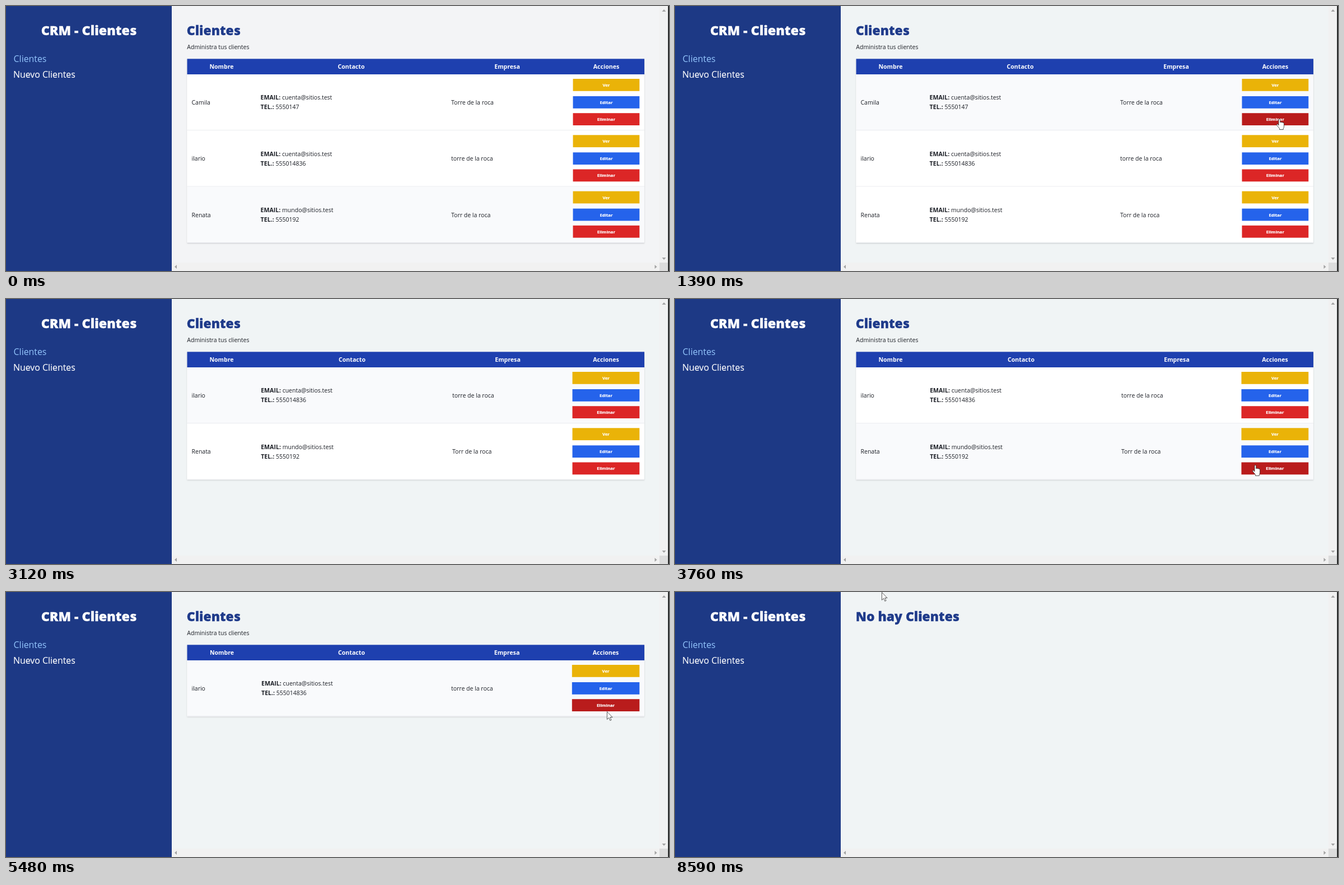
Recreate the animation shown at these times as an HTML page. Size 1184 by 473 pixels, loop 8.99 s.

```html
<!DOCTYPE html>
<html lang="es">
<head>
<meta charset="utf-8">
<title>CRM - Clientes</title>
<style>
html, body { margin: 0; width: 100%; height: 100%; overflow: hidden; background: #f0f4f5; }
svg { display: block; width: 1184px; height: 473px; }
text { font: 400 10.5px "Open Sans", "Noto Sans", sans-serif; fill: #1c1f26; }
.b { font-weight: 700; font-size: 10.6px; }
.th { fill: #fff; text-anchor: middle; }
.title { font-weight: 800; font-size: 22.9px; fill: #1e3a8a; stroke: #1e3a8a; stroke-width: .3px; }
.brand { font-size: 23.3px; fill: #fff; stroke: #fff; text-anchor: middle; }
.link { font-size: 15.9px; fill: #fff; stroke: #fff; stroke-width: .15px; }
.on { fill: #93c5fd; stroke: none; }
.btn { font-weight: 700; font-size: 7.7px; fill: #fff; stroke: #fff; stroke-width: .2px; text-anchor: middle; }
.bar { fill: #f1f1f1; }
.tip { fill: #a3a3a3; }
.card { filter: drop-shadow(0 1px 1.2px rgba(0, 0, 0, .16)); }
#cursor path { fill: #fff; stroke: #222; stroke-width: .75px; stroke-linejoin: round; }
</style>
</head>
<body>
<svg viewBox="0 0 1184 473">
  <rect id="page" x="296" width="888" height="473"/>
  <rect width="296" height="473" fill="#1d3985"/>
  <text class="title brand" x="148" y="52">CRM - Clientes</text>
  <text class="link on" x="13.6" y="100.3">Clientes</text>
  <text class="link" x="13" y="128">Nuevo Clientes</text>
  <rect class="bar" x="1167" width="15" height="458"/>
  <rect class="bar" x="296" y="458" width="871" height="15"/>
  <rect x="1167" y="458" width="15" height="15" fill="#dcdcdc"/>
  <path class="tip" d="M1171.5 10l3.5-4 3.5 4zM1171.5 449l3.5 4 3.5-4zM305 462l-4 3.5 4 3.5zM1158.5 462l4 3.5-4 3.5z"/>
  <rect x="1182.4" width="1.6" height="473" fill="#000"/>
  <g id="main"></g>
  <g id="cursor">
    <path id="arrow" d="M.4.6V14.4l3.2-3 2.2 5 2.2-1-2.2-4.8h4.2z"/>
    <path id="hand" d="M4 12V2q0-1.5 1.4-1.5T6.8 2v5q.2-1 1.3-1t1.3 1.2q.3-.8 1.3-.8t1.2 1.3q.4-.6 1.1-.3.7.4.6 1.3V14q0 2-1.3 3.5v2H5.6v-1.9L1 12q-1-1.2 0-2t2 .3z"/>
  </g>
</svg>
<script>
const LOOP = 8990;

const clients = [
  { name: "Camila", mail: "cuenta@sitios.test", tel: "5550147", firm: "Torre de la roca" },
  { name: "ilario", mail: "cuenta@sitios.test", tel: "555014836", firm: "torre de la roca" },
  { name: "Renata", mail: "mundo@sitios.test", tel: "5550192", firm: "Torr de la roca" }
];

const buttons = [
  { label: "Ver", y: 130, color: "#eab308", dark: "#ca8a04" },
  { label: "Editar", y: 161, color: "#2563eb", dark: "#1d4ed8" },
  { label: "Eliminar", y: 191.2, color: "#dc2626", dark: "#b91c1c" }
];

// Column positions shift a little as the table reflows.
const views = [
  { at: 0, ids: [0, 1, 2], heads: [385, 616.5, 895, 1072], contact: 454.6, firm: 795, left: 1012.5 },
  { at: 3120, ids: [1, 2], heads: [385, 618, 896, 1071.5], contact: 455.2, firm: 797, left: 1011.5 },
  { at: 5080, ids: [1], heads: [385.5, 617, 894.5, 1071], contact: 456, firm: 795, left: 1010.8 },
  { at: 6700, ids: [] }
];

const hovers = [
  { at: 0, row: 2 }, { at: 90 }, { at: 260, row: 0 }, { at: 510, row: 1 },
  { at: 1060, row: 0 }, { at: 1310, row: 0, btn: 2 }, { at: 2950, row: 0 },
  { at: 3200 }, { at: 3280, row: 1, btn: 1 }, { at: 3690, row: 1, btn: 2 },
  { at: 4760 }, { at: 5480, row: 0, btn: 2 }, { at: 6460, row: 0 }, { at: 6700 }
];

const step = (at, x, y, shape = "arrow") => ({ at, x, y, shape });
const hide = at => step(at, 0, 0, "none");
const moves = [
  hide(0), step(260, 620, 180), step(510, 730, 226), step(590, 809, 248), step(750, 841, 234),
  step(980, 872, 228), step(1060, 930, 216), step(1140, 982, 207), step(1220, 1006, 203),
  step(1310, 1066, 202, "hand"), step(1390, 1074, 201, "hand"),
  step(2450, 631, 73), step(2950, 650, 40, "hand"), hide(3120),
  step(3280, 1044, 263, "hand"), step(3610, 1040, 276, "hand"), step(3690, 1034, 292, "hand"),
  step(3760, 1031, 296, "hand"), step(4090, 1019, 291, "hand"),
  step(4760, 690, 84), step(4830, 666, 48), hide(5080), step(5230, 1050, 256),
  step(5480, 1073, 213), step(5560, 1071, 203, "hand"), step(5730, 1073, 201, "hand"),
  step(6210, 699, 78), step(6460, 649, 47, "hand"), step(7600, 465, 291), step(8590, 369, 0)
];

const $ = id => document.getElementById(id);
const current = (list, t) => list.findLast(s => s.at <= t);
const rect = (x, y, w, h, fill) => `<rect x="${x}" y="${y}" width="${w}" height="${h}" fill="${fill}"/>`;
const text = (x, y, cls, s) => `<text x="${x}" y="${y}" class="${cls}">${s}</text>`;
const field = (label, value) => `<tspan class="b">${label}</tspan> ${value}`;

function rowMarkup(view, id, i, hover) {
  const c = clients[id], dy = i * 100.3, lit = hover.row === i;
  const mid = (view.left + 1131.3) / 2;
  return rect(323.5, 122 + dy, 816.5, 100.3, lit ? "#f9fafc" : "#fff") +
    rect(323.5, 221.3 + dy, 816.5, 1, "#e5e7eb") +
    text(331.5, 176 + dy, "", c.name) +
    text(view.contact, 167.4 + dy, "", field("EMAIL:", c.mail)) +
    text(view.contact, 184.3 + dy, "", field("TEL.:", c.tel)) +
    text(view.firm, 176 + dy, "", c.firm) +
    buttons.map((b, k) =>
      rect(view.left, b.y + dy, 1131.3 - view.left, 21.8, lit && hover.btn === k ? b.dark : b.color) +
      text(mid, b.y + 13.9 + dy, "btn", b.label)).join("");
}

function mainMarkup(view, hover) {
  if (!view.ids.length) return text(322.8, 52, "title", "No hay Clientes");
  const names = ["Nombre", "Contacto", "Empresa", "Acciones"];
  return text(322.8, 52, "title", "Clientes") +
    text(323.3, 77, "", "Administra tus clientes") +
    `<g class="card">${rect(323.5, 94.3, 816.5, 27.7 + view.ids.length * 100.3, "#fff")}</g>` +
    rect(323.5, 94.3, 816.5, 27.7, "#1e40af") +
    names.map((n, i) => text(view.heads[i], 112, "b th", n)).join("") +
    view.ids.map((id, i) => rowMarkup(view, id, i, hover)).join("");
}

let lastView, lastHover;
function draw(t) {
  const view = current(views, t), hover = current(hovers, t), m = current(moves, t);
  if (view !== lastView || hover !== lastHover) {
    $("main").innerHTML = mainMarkup(view, hover);
    lastView = view;
    lastHover = hover;
  }
  $("page").setAttribute("fill", t < 90 ? "#f3f4f6" : "#f0f4f5");
  $("cursor").setAttribute("transform", `translate(${m.x} ${m.y})`);
  for (const s of ["arrow", "hand"]) $(s).style.display = m.shape === s ? "" : "none";
}

const start = performance.now();
function tick() {
  draw((performance.now() - start) % LOOP);
  requestAnimationFrame(tick);
}
tick();
</script>
</body>
</html>
```
